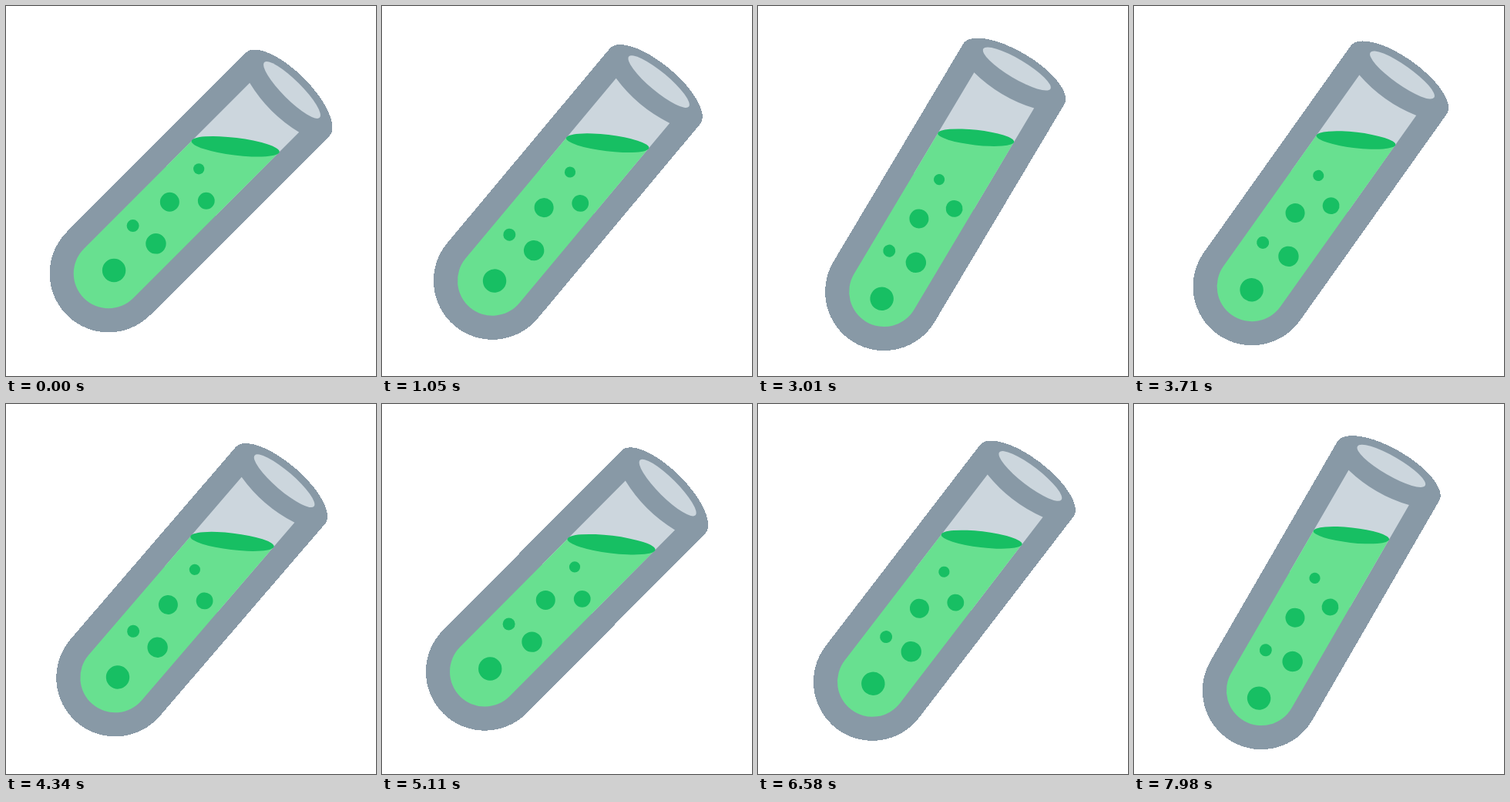
An HTML page for the animation above (8 s loop, 480 by 480 pixels).

```html
<!DOCTYPE html>
<html lang="en">
<head>
<meta charset="utf-8">
<title>Test tube</title>
<style>
  html, body { margin: 0; width: 100%; height: 100%; overflow: hidden; background: #fff; }
  svg { display: block; width: 100%; height: 100%; }
</style>
</head>
<body>
<svg viewBox="0 0 480 480">
  <!-- Drawn upright around (0,0), then tilted -->
  <g id="tube">
    <path fill="#8899a6" shape-rendering="crispEdges"
      d="M-76.4 -177.5A76.4 29.5 0 0 1 76.4 -177.5V151.3A76.4 76.4 0 0 1 -76.4 151.3Z"/>
    <ellipse fill="#ccd6dd" cy="-185.3" rx="50.7" ry="12.4"/>
    <path fill="#ccd6dd" d="M-45.3 -153Q0 -142 45.3 -153V0H-45.3Z"/>
    <path id="liquid" fill="#68e090"/>
    <ellipse id="surface" fill="#17bf63"/>
    <g id="bubbles" fill="#17bf63">
      <circle cx="2.2" cy="143.5" r="15.2"/>
      <circle cx="16.1" cy="80.5" r="13.2"/>
      <circle cx="-21.4" cy="85.2" r="8"/>
      <circle cx="-9.5" cy="29.6" r="12.5"/>
      <circle cx="23" cy="-5" r="10.9"/>
      <circle cx="-13.1" cy="-27.5" r="7.1"/>
    </g>
  </g>
</svg>
<script>
  const LOOP = 8000, STEP = 70;
  const HALF = 2625, START = 20;          // one swing, and when the first begins
  const INNER = 45.3, LEVEL = -81.6;      // inner radius and liquid height
  const [tube, liquid, surface, bubbles] =
    ['tube', 'liquid', 'surface', 'bubbles'].map(id => document.getElementById(id));

  const set = (el, attrs) => {
    for (const key in attrs) el.setAttribute(key, attrs[key]);
  };

  // 0 = fully tilted, 1 = most upright
  function swing(t) {
    const phase = Math.abs(t - START) / HALF % 2;
    const x = phase > 1 ? 2 - phase : phase;
    return x * x * (3 - 2 * x);
  }

  function draw(t) {
    const s = swing(t);
    const turn = -15 * s;
    const slope = 7 - 0.7 * s - 45 - turn;  // surface angle inside the tube
    const rad = slope * Math.PI / 180;
    const rise = INNER * Math.tan(rad);
    const rx = INNER / Math.cos(rad);

    set(tube, { transform: `rotate(${turn} 243.5 236.5) translate(240 240) rotate(45)` });
    set(liquid, {
      d: `M${-INNER} ${LEVEL - rise}L${INNER} ${LEVEL + rise}V151.3` +
         `A${INNER} ${INNER} 0 0 1 ${-INNER} 151.3Z`
    });
    set(surface, {
      rx, ry: rx * 0.198,
      transform: `translate(0 ${LEVEL}) rotate(${slope})`
    });
    set(bubbles, { transform: `translate(0 ${18 * s})` });
  }

  const origin = performance.now();
  function tick() {
    const t = (performance.now() - origin) % LOOP;
    draw(Math.floor(t / STEP) * STEP);
    requestAnimationFrame(tick);
  }
  tick();
</script>
</body>
</html>
```
